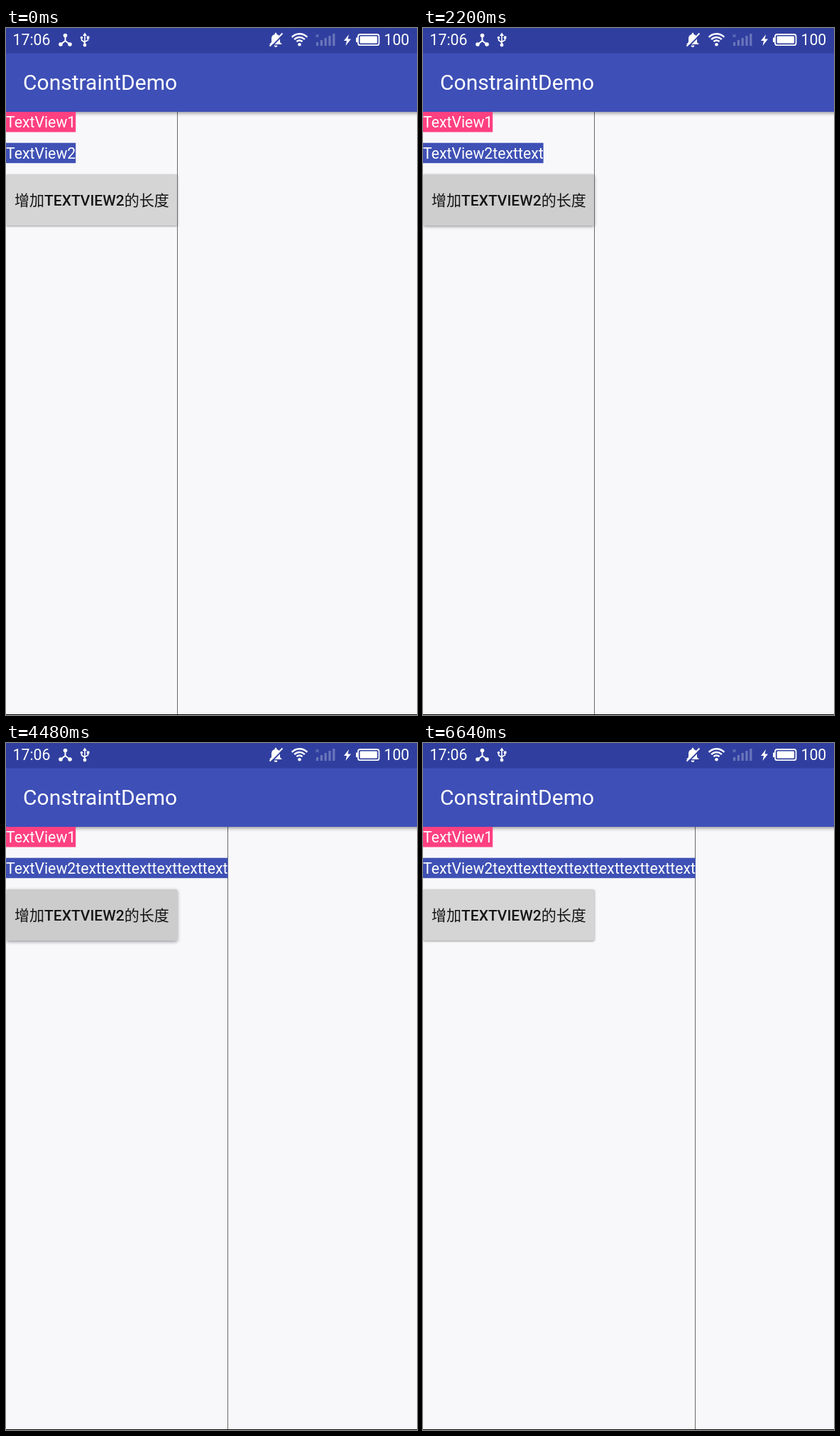
An HTML page with a canvas that plays this animation: 579x967 px, repeating every 7.44 s.

```html
<!DOCTYPE html>
<html lang="zh">
<head>
<meta charset="utf-8">
<title>ConstraintDemo</title>
<style>
html, body { margin: 0; width: 100%; height: 100%; overflow: hidden; background: #f8f8fb; }
canvas { display: block; }
</style>
</head>
<body>
<canvas id="stage" width="579" height="967"></canvas>
<script>
const ctx = document.getElementById('stage').getContext('2d');
const LOOP = 7440, STEP = 40;
const TAPS = [1360, 1920, 2520, 3080, 3680, 4240, 4840, 5360];
const CLICK_DELAY = 120, TAP_LENGTH = 400;
const FONT = 'Roboto, "Noto Sans CJK SC", "Noto Sans CJK", sans-serif';
const BTN = { x: 0, y: 206, w: 241.5, h: 72 };

const clamp = v => Math.max(0, Math.min(1, v));

function rect(x, y, w, h, color) {
  ctx.fillStyle = color;
  ctx.fillRect(x, y, w, h);
}

function text(str, x, y, size, color = '#fff', weight = 400) {
  ctx.font = `${weight} ${size}px ${FONT}`;
  ctx.fillStyle = color;
  ctx.fillText(str, x, y);
}

function stroke(path, width, color = '#fff') {
  ctx.lineWidth = width;
  ctx.strokeStyle = color;
  ctx.stroke(new Path2D(path));
}

function fill(path, color = '#fff') {
  ctx.fillStyle = color;
  ctx.fill(new Path2D(path));
}

function dot(x, y, r) {
  ctx.fillStyle = '#fff';
  ctx.beginPath();
  ctx.arc(x, y, r, 0, Math.PI * 2);
  ctx.fill();
}

function roundRect(x, y, w, h, r) {
  ctx.beginPath();
  ctx.roundRect(x, y, w, h, r);
}

function hubIcon() {
  stroke('M83.5 10V18L77 23M83.5 18L90 23', 2);
  dot(83.5, 10.5, 2.8);
  dot(77, 23, 2.8);
  dot(90, 23, 2.8);
}

function usbIcon() {
  stroke('M111 10V24M106.5 14V17L111 20.5M115.5 13V17L111 19.5', 1.6);
  fill('M111 6.5L114 11H108Z');
  dot(111, 24, 2.4);
  dot(106.5, 13.5, 1.8);
  rect(113.8, 11.5, 3.6, 3.6, '#fff');
}

function bellIcon() {
  fill('M371 23L374 20V15Q374 10 378.5 9Q378.5 6.5 380 6.5Q381.5 6.5 381.5 9Q386 10 386 15V20L389 23Z');
  fill('M377.5 24.5H382.5Q382 27 380 27Q378 27 377.5 24.5Z');
  stroke('M373.5 26.5L391.5 8.5', 1.8, '#303f9f');
  stroke('M371.5 25.5L389.5 7.5', 2);
}

function wifiIcon(active) {
  ctx.strokeStyle = '#fff';
  ctx.lineWidth = 2.4;
  for (const r of [5.5, 10, 14.8]) {
    ctx.beginPath();
    ctx.arc(413.5, 23, r, -Math.PI * 0.76, -Math.PI * 0.24);
    ctx.stroke();
  }
  dot(413.5, 23.3, 2.3);
  if (active) fill('M418 20H426L422 26Z');
}

function signalIcon() {
  for (let i = 0; i < 5; i++) {
    const h = 5 + i * 3;
    rect(437 + i * 5.8, 25 - h, 3.2, h, '#6a75bb');
  }
  stroke('M436.5 9L440.5 13M440.5 9L436.5 13', 1, '#8c95cb');
}

function batteryIcon() {
  fill('M483 9L476 18H480L478.5 25L486 15.5H481.5Z');
  rect(493, 13.5, 2.5, 6.5, '#fff');
  ctx.strokeStyle = ctx.fillStyle = '#fff';
  ctx.lineWidth = 1.8;
  roundRect(496, 9, 29.5, 15.2, 3);
  ctx.stroke();
  roundRect(498.6, 11.6, 24.3, 10, 1.2);
  ctx.fill();
}

function header(wifiActive) {
  ctx.save();
  ctx.shadowColor = 'rgba(0,0,0,.4)';
  ctx.shadowBlur = 5;
  ctx.shadowOffsetY = 2;
  rect(-10, 35, 599, 83, '#3e4fb7');
  ctx.restore();
  rect(0, 0, 579, 35.5, '#303f9f');
  text('17:06', 9.5, 24, 21.3);
  hubIcon();
  usbIcon();
  bellIcon();
  wifiIcon(wifiActive);
  signalIcon();
  batteryIcon();
  text('100', 532.5, 24, 21.2);
  text('ConstraintDemo', 24, 87, 30);
}

function label(str, y, width, color) {
  rect(0, y, width, 28.5, color);
  text(str, 0, y + 22.3, 21.25);
}

function button(age) {
  const pressed = age >= 0 && age < TAP_LENGTH;
  const level = pressed ? clamp((age + 40) / 80) * clamp((TAP_LENGTH - age) / 240) : 0;
  ctx.save();
  ctx.shadowColor = 'rgba(0,0,0,.4)';
  ctx.shadowBlur = 3 + 3 * level;
  ctx.shadowOffsetY = 1 + level;
  ctx.fillStyle = '#d5d5d6';
  roundRect(BTN.x, BTN.y, BTN.w, BTN.h, 2);
  ctx.fill();
  ctx.restore();
  if (pressed) {
    ctx.save();
    roundRect(BTN.x, BTN.y, BTN.w, BTN.h, 2);
    ctx.clip();
    ctx.fillStyle = `rgba(0,0,0,${0.065 * level})`;
    ctx.beginPath();
    ctx.arc(125, 242, 126 * Math.min(1.02, (age + 20) / 197), 0, Math.PI * 2);
    ctx.fill();
    ctx.restore();
  }
  text('增加TEXTVIEW2的长度', 12, 249.5, 21, '#151515', 500);
}

function draw(t) {
  const count = TAPS.filter(tap => t >= tap + CLICK_DELAY).length;
  const lastTap = TAPS.filter(tap => t >= tap).pop() ?? Infinity;
  const width = 98.2 + 35.7 * count;

  rect(0, 0, 579, 967, '#f8f8fb');
  button(t - lastTap);
  rect(Math.floor(Math.max(BTN.w, width)), 118, 1, 848, '#686868');
  header(t >= 5600 && t < 6640);
  label('TextView1', 118, 98.2, '#ff4081');
  label('TextView2' + 'text'.repeat(count), 161.7, width, '#3f51b5');
  rect(0, 966, 579, 1, '#000');
}

const start = performance.now();
function tick() {
  const t = (performance.now() - start) % LOOP;
  draw(Math.floor(t / STEP) * STEP);
  requestAnimationFrame(tick);
}
tick();
</script>
</body>
</html>
```
